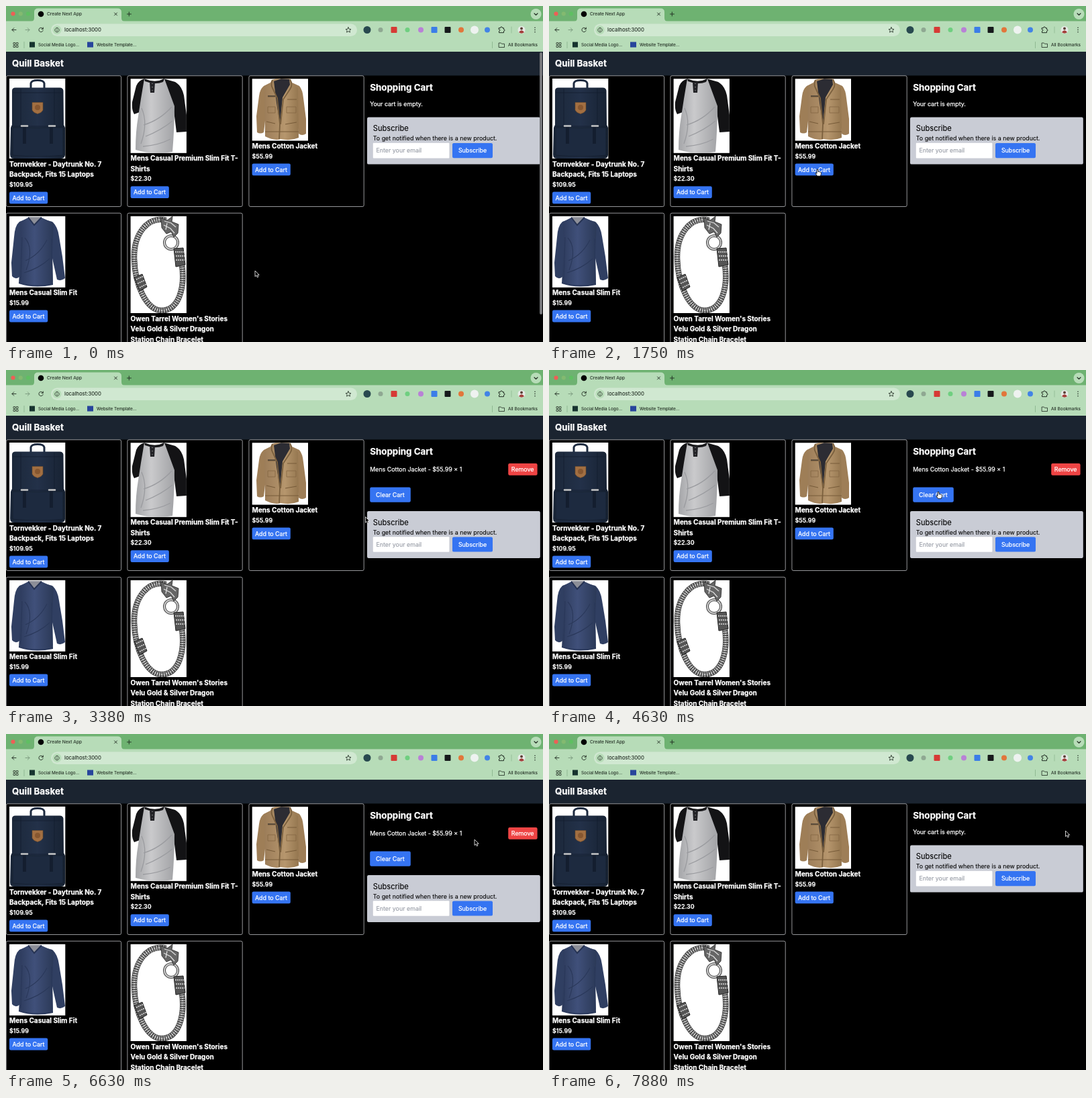
Animation of 800x500 px, one loop 8 s. Source, as an HTML page:

```html
<!DOCTYPE html>
<html lang="en">
<head>
<meta charset="utf-8">
<title>Shop page</title>
<style>
html, body { margin: 0; width: 100%; height: 100%; overflow: hidden; background: #000; }
svg { display: block; width: 800px; height: 500px; }
text { font-family: Inter, "Liberation Sans", sans-serif; white-space: pre; }
</style>
</head>
<body>
<svg id="stage" viewBox="0 0 800 500" xmlns="http://www.w3.org/2000/svg">
  <defs>
    <linearGradient id="navy"><stop offset="0" stop-color="#1b2739"/><stop offset=".5" stop-color="#233149"/><stop offset="1" stop-color="#172232"/></linearGradient>
    <linearGradient id="grey"><stop offset="0" stop-color="#a4a5a8"/><stop offset=".4" stop-color="#cacacc"/><stop offset="1" stop-color="#a2a3a6"/></linearGradient>
    <linearGradient id="tan"><stop offset="0" stop-color="#9c7d59"/><stop offset=".6" stop-color="#b6966d"/><stop offset="1" stop-color="#94764f"/></linearGradient>
    <linearGradient id="blue"><stop offset="0" stop-color="#2d3b5c"/><stop offset=".45" stop-color="#40507a"/><stop offset="1" stop-color="#2b3957"/></linearGradient>
  </defs>
  <rect width="800" height="500"/>
  <g id="browser"></g>
  <g id="shop"></g>

  <g id="backpack">
    <rect x="5" y="108" width="83.3" height="119" fill="#fff"/>
    <path d="M37 123V115Q38 110.500 47 110.500T57 115V123" fill="none" stroke="#1e2b40" stroke-width="3"/>
    <path d="M9 126Q9 121.500 14 121.500H80Q85 121.500 85.500 126L86 177L88 181V222Q87 227 82 227H12Q6 227 6 221L7 181L9 177Z" fill="url(#navy)"/>
    <path d="M10 129H85M8 179H87M22 123V221M72 123V221" fill="none" stroke="#141e2f" stroke-width=".8"/>
    <path d="M10 181H85V222Q47 226 10 222Z" fill="#1d2a3f" stroke="#121b2b" stroke-width=".6"/>
    <path d="M25 178H30V205H25ZM65 178H70V205H65Z" fill="#141e2f"/>
    <path d="M23 178.500H32M64 178.500H73" stroke="#c5c6c6" stroke-width="2.600" stroke-linecap="round"/>
    <path d="M39 143.500H55V155Q53 159 47 160.500Q41 159 39 155Z" fill="#a26f42" stroke="#6e4a2a" stroke-width=".6"/>
    <circle cx="47" cy="151" r="4" fill="#875730"/>
  </g>

  <g id="tee">
    <rect x="185.600" y="108.300" width="83.300" height="110.500" fill="#fff"/>
    <path d="M206 108.300Q197 111 194 119L188 143Q187 155 191 161L199 158L208 118ZM235 108.300L252 113Q262 119 265 133L268.900 162V187L254 188L249 148L228 112Z" fill="#131315"/>
    <path d="M206 108.300L201 138Q199 151 197 164Q193 187 193 214Q220 222 248 217Q251 181 251 149L236 108.300Q222 116 206 108.300Z" fill="url(#grey)"/>
    <path d="M206 108.300Q222 115 236 108.300L234 113Q222 118 207 112Z" fill="#19191b"/>
    <path d="M214 113H222L221 129H215Z" fill="#222226"/>
    <path d="M218 115V128" stroke="#aaa" stroke-width="1.100" stroke-dasharray="1.100 4"/>
    <path d="M202 152Q212 174 201 205M247 150Q229 170 205 177M248 171Q231 185 208 194M245 198Q228 207 204 209" fill="none" stroke="#9a9b9f" stroke-width="1.300"/>
  </g>

  <g id="jacket">
    <rect x="366.700" y="108.300" width="83.300" height="92.200" fill="#fff"/>
    <path d="M394 114L384 119Q378 124 377 134L373 164L374 188Q379 191 384 188L389 145ZM426 114L437 119Q442 125 443 137L447 168V190Q441 194 436 190L431 145Z" fill="#9e7e57"/>
    <path d="M396 110L393 116L385 121L386 194Q400 201 409 198Q424 201 436 196L435 122L427 116L422 108.300H402Z" fill="url(#tan)"/>
    <path d="M399 112L410 108.300L422 109L423 117L412 136L408 175L403 144Z" fill="#2c2c33"/>
    <path d="M397 110Q394 117 397 122L404 137L408 176L407 198M423 109Q428 117 423 124L413 139L409 176" fill="none" stroke="#7b603e" stroke-width="1.800"/>
    <path d="M390 135H402M419 139H433M388 172L401 175M416 176L433 173M386 187H436" stroke="#765a38" stroke-width="1"/>
    <path d="M390 134H401" stroke="#33302c" stroke-width="1.200"/>
    <path d="M390 150H401V159H390ZM418 150H432V159H418Z" fill="none" stroke="#846642" stroke-width=".8"/>
  </g>

  <g id="sweater">
    <rect x="5" y="312.800" width="83.300" height="106" fill="#fff"/>
    <path d="M32 317L20 321Q13 327 12 344L8 382L9 402Q14 408 20 403L27 360ZM54 317L69 321Q77 328 79 343L84 373L88 405Q82 410 76 407L66 362Z" fill="#303f62"/>
    <path d="M33 315L21 321L22 358L19 413Q42 421 70 415L69 368L71 323L53 315L42 325Z" fill="url(#blue)"/>
    <path d="M33 314H53L42 325Z" fill="#8d8f98"/>
    <path d="M33 314.500L42 326L53 314.500" fill="none" stroke="#253252" stroke-width="2"/>
    <path d="M24 344L22 408M68 346L69 410M28 345Q42 360 30 393M61 348Q50 370 29 379M65 376Q50 390 27 397M19 412Q42 419 70 414" fill="none" stroke="#2a385a" stroke-width="1.100"/>
  </g>

  <g id="bracelet" fill="none">
    <rect x="185.600" y="312.800" width="83.300" height="144.200" fill="#fff"/>
    <g id="chain"></g>
    <circle cx="246" cy="352" r="10" stroke="#444" stroke-width="4"/>
    <circle cx="246" cy="352" r="10" stroke="#ccc" stroke-width="2"/>
    <path d="M231 315L240 319L248 313L247 321L257 325L256 338L250 344L246 336L239 339L232 330Z" fill="#666" stroke="#222" stroke-width=".8"/>
    <path d="M236 320L246 323L253 329M235 326L245 331L251 338M240 323L238 333" stroke="#ddd" stroke-width="1.300"/>
    <path d="M250 361L264 360L267 385L253 388Z" fill="#555" stroke="#222"/>
    <path d="M191 404L203 399L210 418L199 424Z" fill="#555" stroke="#222"/>
    <path d="M252 366H265M253 372H266M253 378H266M194 407L205 402M196 413L207 408M199 419L209 414" stroke="#ddd" stroke-width="1.500" stroke-dasharray="2 1"/>
  </g>

  <g id="cart"></g>
  <rect id="bar" x="795" y="69" width="4" height="390" rx="2" fill="#77787b"/>
  <g id="cursor">
    <path id="arrow" d="M0 0V8.600L2 6.800L3.300 9.800L4.900 9.100L3.600 6.200H6.200Z" fill="#000" stroke="#fff" stroke-width=".8" stroke-linejoin="round"/>
    <path id="hand" d="M-1 .8Q0 -.5 1 .8V4L2.200 3.700L3.300 4.200L4.500 4.300L5.400 5.200V7.500L4.400 10.300H-.4L-2.900 6.800Q-3.300 5.500 -2 5.700L-1 6.600Z" fill="#fff" stroke="#111" stroke-width=".9" stroke-linejoin="round"/>
  </g>
</svg>
<script>
const $ = id => document.getElementById(id);
const BLUE = '#3574f2', INK = '#1f2a20', TAB = '#6eb271', BAR = '#b7dcb8';

// A hairline stroke gives the slightly heavier screen rendering.
const text = (x, y, s, size = 8.89, fill = '#fff', weight = 400, anchor = 'start') =>
  `<text x="${x}" y="${y}" font-size="${size}" font-weight="${weight}" fill="${fill}" stroke="${fill}" stroke-width="${fill === '#fff' ? 0.25 : 0.08}" text-anchor="${anchor}">${s}</text>`;
const rect = (x, y, w, h, fill, r = 0, more = '') =>
  `<rect x="${x}" y="${y}" width="${w}" height="${h}" rx="${r}" fill="${fill}" ${more}/>`;
const dot = (x, y, r, fill) => `<circle cx="${x}" cy="${y}" r="${r}" fill="${fill}"/>`;
const line = (d, color = INK, w = 0.9) =>
  `<path d="${d}" fill="none" stroke="${color}" stroke-width="${w}" stroke-linecap="round" stroke-linejoin="round"/>`;
const button = (x, y, w, h, s, pad, fill = BLUE) =>
  rect(x, y, w, h, fill, 2.2) + text(x + pad, y + h / 2 + 3.3, s);

function drawBrowser() {
  const icons = [
    [538, '#28494f', 5.5], [558, '#8fa892', 3.5], [578, '#d63a35', 0], [598, '#6fcf80', 3.5],
    [618, '#b981d6', 4], [638, '#3b7de8', 0], [658, '#16191b', 0], [678, '#e2763b', 4],
    [698, '#eef2f0', 6], [717, '#4283e6', 4]
  ];
  let s = rect(0, 0, 800, 24, TAB) + rect(0, 22.5, 800, 45.5, BAR);
  s += `<path d="M37 23Q42 23 42 18V9Q42 3.500 48 3.500H166Q172 3.500 172 9V18Q172 23 177 23Z" fill="${BAR}"/>`;
  s += dot(10.5, 11.5, 3.1, '#ee5f56') + dot(21.8, 11.5, 3.1, '#83ba70') + dot(33, 11.5, 3.1, '#5fbf62');
  s += dot(52, 12, 4.3, '#000') + text(61, 14.4, 'Create Next App', 6.67, INK);
  s += line('M161.500 10L165.500 14M165.500 10L161.500 14') + line('M180.500 12H186.500M183.300 9V15');
  s += dot(789.5, 12, 8, BAR) + line('M787 11L789.500 13.500L792 11', INK, 1.1);
  s += line('M15 35.500H9M11.800 32.700L9 35.500L11.800 38.300');
  s += line('M29 35.500H35M32.200 32.700L35 35.500L32.200 38.300', '#76967a');
  s += line('M55 34A3.200 3.200 0 1 0 55.200 36.500M55.300 32V34.300H53');
  s += rect(67, 26.5, 456, 18.5, '#d0e8d1', 9.25) + dot(76, 35.7, 6.6, BAR);
  s += line('M76 32.500A3.200 3.200 0 1 0 76.010 32.500M76 35.500V37.300M76 33.900V34', INK, 0.8);
  s += text(87, 38.3, 'localhost:3000', 7.78, INK);
  s += line('M510 31.700L511.200 34.300L514 34.600L511.900 36.400L512.500 39.200L510 37.700L507.500 39.200L508.100 36.400L506 34.600L508.800 34.300Z', INK, 0.8);
  for (const [x, c, r] of icons)
    s += r ? dot(x, 35.5, r, c) : rect(x - 4.5, 31, 9, 9, c, 1);
  s += line('M734.500 32.700H736.500Q736.500 31 738 31T739.500 32.700H741.500V34.800Q743 34.800 743 36T741.500 37.400V39.700H734.500V37.400Q736 37 736 36T734.500 34.800Z', INK, 1);
  s += line('M753 31V40', '#88b28b', 0.7);
  s += dot(768, 35.5, 5.5, '#e6e9e6') + dot(768, 33.5, 2, '#5b4036')
    + '<path d="M764 39Q768 33.500 772 39Q768 42.500 764 39Z" fill="#a23d38"/>';
  s += dot(788, 32.2, 0.8, INK) + dot(788, 35.5, 0.8, INK) + dot(788, 38.8, 0.8, INK);
  for (const x of [11, 15.2]) for (const y of [54.5, 58.7])
    s += rect(x, y, 2.8, 2.8, 'none', 0.3, `stroke="${INK}" stroke-width=".8"`);
  s += line('M27 53.500V62.500M724.500 53.500V62.500', '#7fa982', 0.7);
  s += rect(35, 53.5, 8, 8, '#17342f') + text(48, 60.2, 'Social Media Logo...', 6.4, INK);
  s += rect(121, 53.5, 9, 8, '#27459c') + text(135, 60.2, 'Website Template...', 6.4, INK);
  s += line('M734.500 55H737.300L738.500 56.300H742.500V61.500H734.500Z', INK, 0.8);
  s += text(792, 60.2, 'All Bookmarks', 6.5, INK, 400, 'end');
  $('browser').innerHTML = s;
}

function drawShop() {
  const cards = [
    [0.3, 103.8, 227, ['Tornvekker - Daytrunk No. 7', 'Backpack, Fits 15 Laptops'], '$109.95'],
    [180.9, 103.8, 218.8, ['Mens Casual Premium Slim Fit T-', 'Shirts'], '$22.30'],
    [361.9, 103.8, 200.5, ['Mens Cotton Jacket'], '$55.99'],
    [0.3, 308.2, 418.7, ['Mens Casual Slim Fit'], '$15.99'],
    [180.9, 308.2, 457, ["Owen Tarrel Women's Stories", 'Velu Gold &amp; Silver Dragon', 'Station Chain Bracelet'], '']
  ];
  let s = rect(0, 68, 800, 35.5, '#1b2430') + text(8.9, 90.3, 'Quill Basket', 13.33, '#fff', 700);
  for (const [x, y, bottom, name, price] of cards) {
    const left = x + 4.7;
    let base = bottom + 11.5;
    s += rect(x, y, 171.3, y < 200 ? 194.7 : 230, 'none', 2.2, 'stroke="#e5e7eb" stroke-width=".65"');
    name.forEach((part, i) => s += text(left, base + i * 15.56, part, 10, '#fff', 700));
    base += (name.length - 1) * 15.56;
    if (price)
      s += text(left, base + 14.6, price, 8.89, '#fff', 600) + button(left, base + 22.4, 57.2, 17.8, 'Add to Cart', 4.4);
  }
  $('shop').innerHTML = s;
}

function drawChain() {
  const d = 'M239 319C212 312 190 338 191 376C192 415 209 453 232 453C257 453 267 420 262 385';
  const coat = (c, w, dash = '') => `<path d="${d}" stroke="${c}" stroke-width="${w}" stroke-dasharray="${dash}"/>`;
  $('chain').innerHTML = coat('#3c3c3c', 8.5) + coat('#bdbdbd', 7, '1.800 1.600') + coat('#4c4c4c', 2.8) + coat('#ececec', 2, '1.700 1.700');
}

function drawCart() {
  $('cart').innerHTML =
    text(542.2, 125.7, 'Shopping Cart', 13.33, '#fff', 700) +
    `<g id="empty">${text(542.2, 149, 'Your cart is empty.')}</g>` +
    `<g id="filled">${text(542.2, 151.2, 'Mens Cotton Jacket - $55.99 × 1')}` +
    button(748.2, 139, 43.4, 17.8, 'Remove', 4.6, '#ef4444') +
    button(542.2, 174.5, 60.6, 22.3, 'Clear Cart', 8.9) + '</g>' +
    `<g id="panel">${rect(538, 165.6, 257.8, 70, '#c9ccd5', 2.2)}` +
    text(546.8, 186.2, 'Subscribe', 11.11, '#000') +
    text(546.8, 200.2, 'To get notified when there is a new product.', 8.89, '#000') +
    rect(546.8, 203.8, 113.6, 22.6, '#fff', 1) +
    text(551.4, 218.4, 'Enter your email', 8.89, '#9297a1') +
    button(665, 204, 60, 22.2, 'Subscribe', 8.9) + '</g>';
}

// time, x, y of the pointer tip
const path = [
  [0, 371, 394], [130, 371, 394], [880, 396, 241], [1500, 397, 241.5], [2000, 403, 244],
  [2750, 403, 244], [3380, 535.5, 218.5], [4000, 578, 182], [4630, 580, 181], [5630, 580, 181],
  [6630, 698, 157], [7130, 769, 145], [7500, 769.5, 144], [8000, 769.5, 144]
];
const LOOP = 8000, STEP = 125, ADDED = 2750, REMOVED = 7500;

function pointer(t) {
  const i = path.findIndex((p, k) => k && t < p[0]);
  const [a, b] = [path[i - 1], path[i]];
  const u = (t - a[0]) / (b[0] - a[0]), e = u * u * (3 - 2 * u);
  return [a[1] + (b[1] - a[1]) * e, a[2] + (b[2] - a[2]) * e];
}

const inside = (x, y, l, t, w, h) => x >= l && x <= l + w && y >= t && y <= t + h;
const show = (id, on) => $(id).setAttribute('visibility', on ? 'visible' : 'hidden');

function render(now) {
  const t = Math.floor((now % LOOP) / STEP) * STEP;
  const full = t >= ADDED && t < REMOVED;
  const [x, y] = pointer(t);
  const over = inside(x, y, 366.6, 234.4, 57.2, 17.8) ||
    full && (inside(x, y, 542, 174.5, 60.6, 22.3) || inside(x, y, 748, 139, 43.4, 17.8));
  show('empty', !full);
  show('filled', full);
  $('panel').setAttribute('transform', `translate(0 ${full ? 44.4 : 0})`);
  show('arrow', !over);
  show('hand', over);
  $('cursor').setAttribute('transform', `translate(${x} ${y})`);
  $('bar').setAttribute('opacity', Math.max(0, Math.min(1, (750 - t) / 375)));
}

drawBrowser();
drawShop();
drawChain();
drawCart();
const start = performance.now();
function tick() {
  render(performance.now() - start);
  requestAnimationFrame(tick);
}
tick();
</script>
</body>
</html>
```
